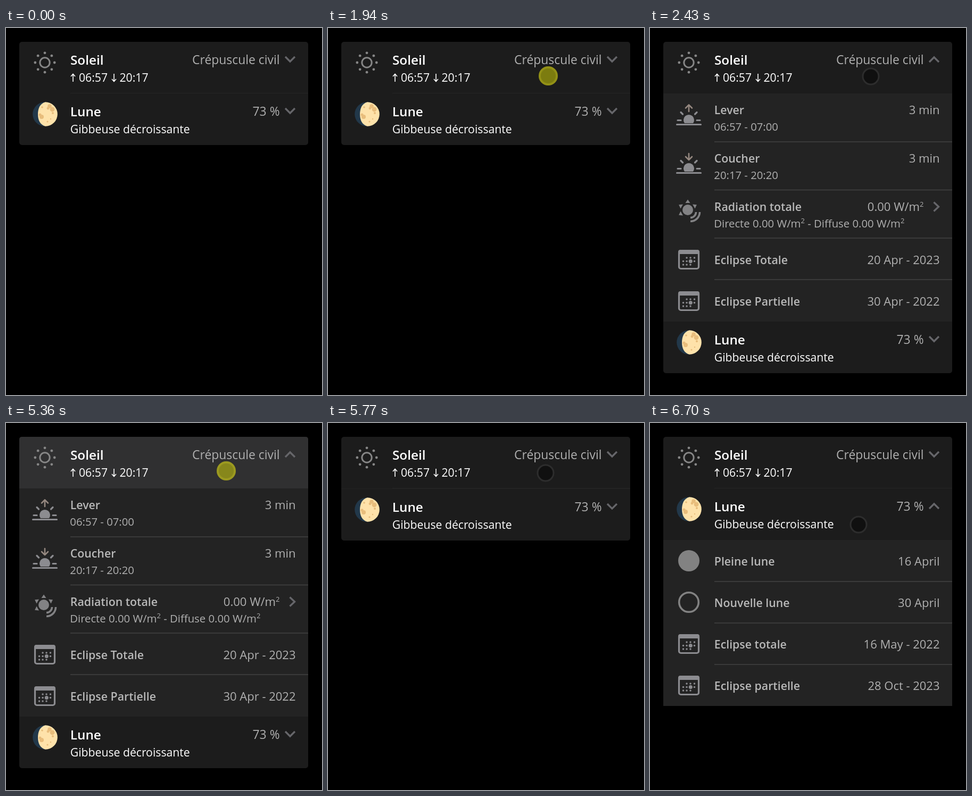
Write an HTML page that moves like this. It is 594 px wide and 690 px high and loops after 8000 ms.

```html
<!DOCTYPE html>
<html lang="fr">
<head>
<meta charset="utf-8">
<title>Soleil et lune</title>
<style>
html, body { margin: 0; width: 100%; height: 100%; overflow: hidden; background: #000; }
svg { display: block; }
text { font-family: "Open Sans", "Noto Sans", sans-serif; white-space: pre; }
.title { font-size: 24.3px; font-weight: 600; fill: #fff; }
.sub { font-size: 21.2px; fill: #fff; }
.state { font-size: 22.9px; fill: #b0b0b0; text-anchor: end; }
.name { font-size: 21.3px; font-weight: 600; fill: #b8b8b8; }
.note { font-size: 20.3px; fill: #b0b0b0; }
.value { font-size: 22px; fill: #b0b0b0; text-anchor: end; }
.sup { font-size: 13px; }
.line { fill: none; stroke: #8c8c90; stroke-width: 3.2; stroke-linecap: round; stroke-linejoin: round; }
.chev { fill: none; stroke: #66666a; stroke-width: 3.4; }
.rule { stroke: #424242; stroke-width: 1.3; }
.icon { fill: #8c8c90; }
</style>
</head>
<body>
<svg id="stage" width="594" height="690" viewBox="0 0 594 690"></svg>
<script>
const LOOP = 8000, SUN_H = 429, MOON_H = 312;

// Markup helpers
const text = (cls, x, y, s) => `<text class="${cls}" x="${x}" y="${y}">${s}</text>`;
const path = (cls, d, extra = '') => `<path class="${cls}" d="${d}" ${extra}/>`;
const dot = (x, y, r, extra = 'class="icon"') => `<circle cx="${x}" cy="${y}" r="${r}" ${extra}/>`;
const rect = (id, y, h, fill, extra = '') =>
  `<rect id="${id}" x="25" y="${y}" width="543" height="${h}" fill="${fill}" ${extra}/>`;
const rule = y => path('rule', `M121 ${y}H568`);
const at = (y, body) => `<g transform="translate(0 ${y})">${body}</g>`;

function sunIcon() {
  let s = dot(73, 65, 9.2, 'fill="none" stroke="#868686" stroke-width="3"');
  for (let i = 0; i < 8; i++) {
    const a = i * Math.PI / 4;
    s += dot(73 + 18.2 * Math.cos(a), 65 + 18.2 * Math.sin(a), 2.4, 'fill="#868686"');
  }
  return s;
}

function moonIcon() {
  const craters = [[82, 147, 3.8], [87, 153, 4.4], [79, 151, 2.4], [88, 160, 2], [67, 167, 4],
    [64, 163, 2.6], [68, 149, 1.8], [78, 176, 1.6], [84, 171, 1.2]];
  return dot(73, 162, 22.8, 'fill="#22384a"') +
    path('', 'M74 139.2A22.8 22.8 0 0 1 74 184.8C64 182 60 173 60 162S64 142 74 139.2Z', 'fill="#fee2aa"') +
    craters.map(([x, y, r]) => dot(x, y, r, 'fill="#e8bd7c"')).join('');
}

// Horizon icon; the arrow points up for sunrise, down for sunset
function horizonIcon(up) {
  const head = up ? 'M67 150.5L73 144.5L79 150.5' : 'M67 151L73 157L79 151';
  return path('icon', 'M65 179A10 10 0 1 1 81 179Z') +
    path('line', 'M50.5 181.5H95.5M52 173.5H58M88 173.5H94M58 158.5L61.5 162M88 158.5L84.5 162') +
    path('line', 'M73 145V157' + head, 'style="stroke:#94877f;stroke-width:2.6"');
}

function radiationIcon() {
  const rays = [0, 60, -60, -120].map(a =>
    path('', 'M71 322.5L75.5 329H66.5Z', `fill="#828284" transform="rotate(${a} 71 342)"`)).join('');
  return rays + dot(71, 342, 10, 'fill="#828284"') +
    path('line', 'M86.5 346A10.5 10.5 0 0 1 76 356.5M93.5 346A17.5 17.5 0 0 1 76 363.5',
      'style="stroke:#828284;stroke-width:3.6;stroke-linecap:butt"');
}

function calendarIcon(y) {
  let s = `<rect x="54.5" y="-17" width="37" height="34" rx="3.5" class="line"/>` +
    path('icon', 'M53 -10.5V-14.5Q53 -18.6 57 -18.6H89Q93 -18.6 93 -14.5V-10.5Z');
  [[69, 76, 83.5], [62.5, 69, 83.5], [62.5, 69, 76]].forEach((row, i) => {
    for (const x of row) s += dot(x, -3.5 + i * 6.5, 1.75);
  });
  return at(y, s + dot(76.3, 3, 3.5));
}

const arrow = (x, up) => path('', up
  ? `M${x} 101V87M${x - 4} 91L${x} 86.5L${x + 4} 91`
  : `M${x} 86V100M${x - 4} 96L${x} 100.5L${x + 4} 96`,
  'fill="none" stroke="#fff" stroke-width="1.6"');

const row = (y, name, value, note, right = 544.5) =>
  text('name', 120.8, y, name) + text('value', right, y, value) + (note ? text('note', 120.3, y + 30.7, note) : '');

const flux = v => `${v} W/m<tspan class="sup" dy="-8">2</tspan>`;

const sunHead = sunIcon() + text('title', 121, 69, 'Soleil') +
  arrow(126, true) + text('sub', 137, 101, '06:57') + arrow(203, false) + text('sub', 213.5, 101, '20:17') +
  text('state', 514.5, 68, 'Crépuscule civil') + path('chev', '', 'id="sunChev"');

const sunList = rect('sunBack', 123, SUN_H, '#232323') +
  horizonIcon(true) + row(162, 'Lever', '3 min', '06:57 - 07:00') + rule(214) +
  at(91, horizonIcon(false)) + row(253, 'Coucher', '3 min', '20:17 - 20:20') + rule(304.5) +
  radiationIcon() +
  row(344, 'Radiation totale', flux('0.00'),
    `Directe ${flux('0.00')}<tspan dy="8"> - Diffuse </tspan>${flux('0.00')}`, 514.5) +
  path('chev', 'M533.5 327.5L542.5 336L533.5 344.5') + rule(395) +
  calendarIcon(435.5) + row(444, 'Eclipse Totale', '20 Apr - 2023') + rule(473) +
  calendarIcon(513.5) + row(522, 'Eclipse Partielle', '30 Apr - 2022');

const moonHead = moonIcon() + text('title', 120.8, 166, 'Lune') + text('sub', 120.8, 198, 'Gibbeuse décroissante') +
  text('state', 514.5, 165, '73 %') + path('chev', '', 'id="moonChev"');

const moonList = rect('moonBack', 220, MOON_H, '#232323') +
  dot(73, 259, 20, 'fill="#828282"') + row(268, 'Pleine lune', '16 April') + rule(298) +
  dot(73, 337, 18.3, 'fill="none" stroke="#828282" stroke-width="3.6"') +
  row(346, 'Nouvelle lune', '30 April') + rule(376) +
  calendarIcon(415.5) + row(424, 'Eclipse totale', '16 May - 2022') + rule(454) +
  calendarIcon(493.5) + row(502, 'Eclipse partielle', '28 Oct - 2023');

const clip = (id, y) => `<clipPath id="${id}Clip">${rect(id, y, 0, '#fff')}</clipPath>`;

document.getElementById('stage').innerHTML =
  `<defs>${clip('sunOpen', 123)}${clip('moonOpen', 220)}</defs>` +
  rect('panel', 26, 194, '#1c1c1c', 'rx="5"') +
  path('', 'M121 122.5H568', 'id="seam" stroke="#252525"') +
  path('', 'M25 123V31Q25 26 30 26H563Q568 26 568 31V123Z', 'id="sunGlow" fill="#303031"') + sunHead +
  `<g clip-path="url(#sunOpenClip)">${sunList}</g>` +
  `<g id="moon">${rect('moonGlow', 123, 97, '#2e3031')}${moonHead}` +
  `<g clip-path="url(#moonOpenClip)">${moonList}</g></g>` +
  `<g id="cursor"><circle id="disc"/><circle id="ring" fill="none"/></g>`;

const el = {};
document.querySelectorAll('[id]').forEach(n => el[n.id] = n);
const set = (id, attrs) => { for (const k in attrs) el[id].setAttribute(k, attrs[k]); };

// Timing helpers
const span = (t, a, b) => Math.min(1, Math.max(0, (t - a) / (b - a)));
const smooth = p => p * p * (3 - 2 * p);
const between = (t, a, b) => t >= a && t < b;

// cubic-bezier(.25, .1, .25, 1)
function ease(x) {
  if (x <= 0 || x >= 1) return x <= 0 ? 0 : 1;
  let lo = 0, hi = 1, s = x;
  for (let i = 0; i < 24; i++) {
    s = (lo + hi) / 2;
    const bx = .75 * s * (1 - s) + s * s * s;
    if (bx < x) lo = s; else hi = s;
  }
  return .3 * s * (1 - s) ** 2 + 3 * s * s * (1 - s) + s ** 3;
}

// Pointer stops: time, x, y
const stops = [[930, 450, 580], [1730, 412, 93], [1810, 412, 93], [1880, 415, 91],
  [5490, 415, 91], [5770, 409, 94], [6030, 392, 191], [LOOP, 392, 191]];

function pointer(t) {
  const i = Math.max(1, stops.findIndex(s => s[0] > t));
  const [a, x0, y0] = stops[i - 1], [b, x1, y1] = stops[i];
  const p = smooth(span(t, a, b));
  return [x0 + (x1 - x0) * p, y0 + (y1 - y0) * p];
}

const chevron = (y, open) => open ? `M525 ${y + 6}L534 ${y - 3}L543 ${y + 6}` : `M525 ${y - 4}L534 ${y + 5}L543 ${y - 4}`;

// Full while pressed, then fades out
const glow = (t, down, up) => t < down ? 0 : 1 - span(t, up, up + 250);

function draw(t) {
  const sunH = SUN_H * (ease(span(t, 2080, 2380)) - ease(span(t, 5490, 5790)));
  const moonH = MOON_H * ease(span(t, 6450, 6695));
  set('panel', { height: 194 + sunH + moonH });
  set('seam', { visibility: sunH > 2 ? 'hidden' : 'visible' });
  set('sunOpen', { height: sunH });
  set('moonOpen', { height: moonH });
  set('moon', { transform: `translate(0 ${sunH})` });
  set('sunChev', { d: chevron(58, between(t, 2080, 5490)) });
  set('moonChev', { d: chevron(155, t >= 6450) });
  set('sunGlow', { opacity: t < 4000 ? glow(t, 2010, 2080) : glow(t, 5360, 5490) });
  set('moonGlow', { opacity: glow(t, 6360, 6450) });

  const pressed = between(t, 1940, 2080) || between(t, 5360, 5490) || between(t, 6360, 6450);
  const [x, y] = pointer(t), shift = pressed ? 1 : 0;
  set('cursor', { transform: `translate(${x - shift} ${y - shift})`, visibility: t < 930 ? 'hidden' : 'visible' });
  set('disc', pressed ? { r: 18, fill: 'rgb(238 238 0 / .46)' } : { r: 15, fill: '#101010' });
  set('ring', pressed
    ? { r: 16, stroke: 'rgb(240 230 50 / .2)', 'stroke-width': 4 }
    : { r: 15, stroke: '#2d2d2d', 'stroke-width': 3 });
}

const start = performance.now();
function tick() {
  draw((performance.now() - start) % LOOP);
  requestAnimationFrame(tick);
}
tick();
</script>
</body>
</html>
```
